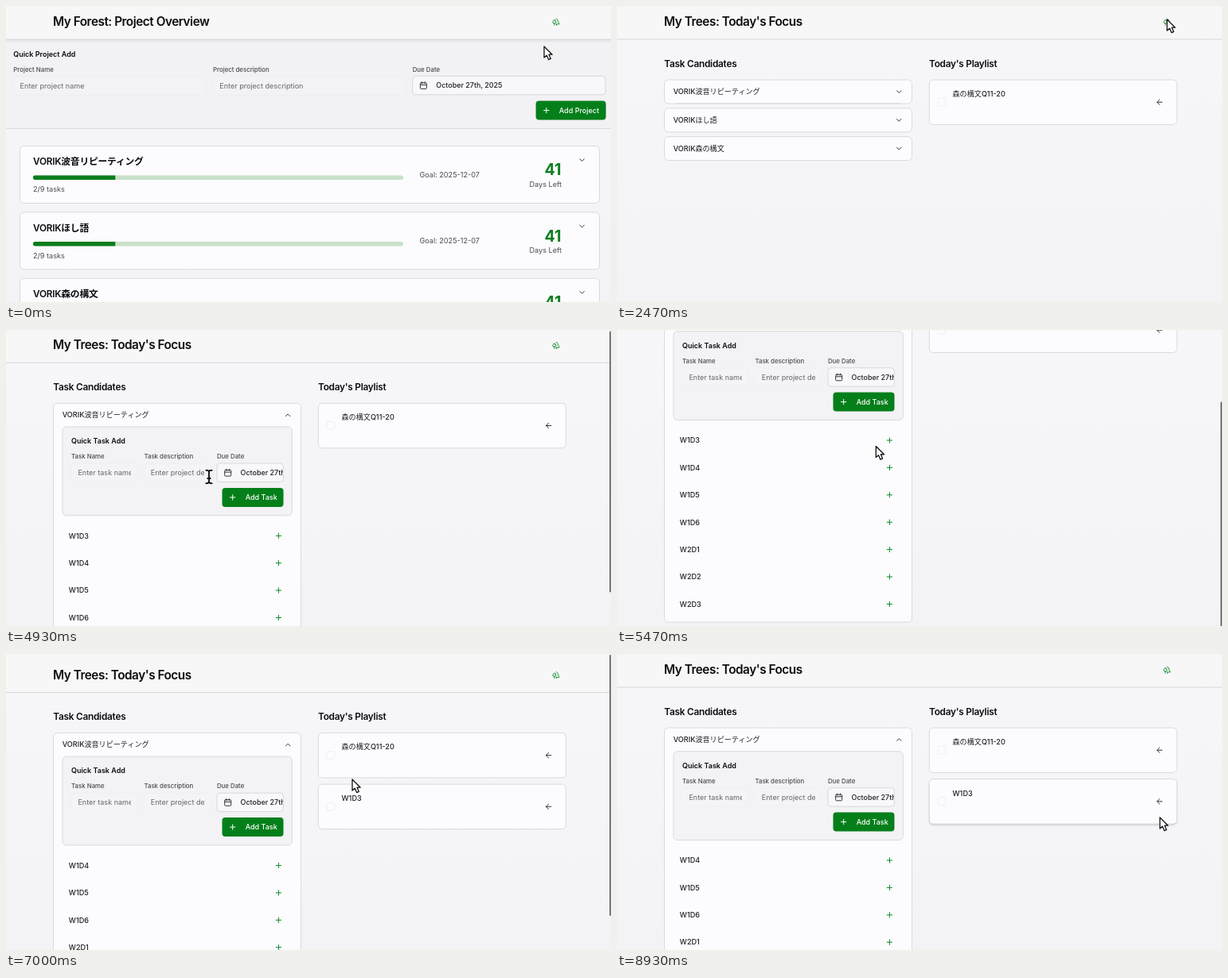
Recreate the animation shown at these times as an HTML page. Size 760 px wide and 373 px high, loop 8.99 s.

```html
<!DOCTYPE html>
<html lang="en">
<head>
<meta charset="utf-8">
<title>Project planner</title>
<style>
html, body { margin: 0; width: 100%; height: 100%; overflow: hidden; background: #f5f4f6; }
svg { display: block; width: 760px; height: 373px; }
text { font: 400 9.1px Inter, "Noto Sans CJK JP", sans-serif; fill: #202024; white-space: pre; }
.title { font-size: 15.3px; font-weight: 600; letter-spacing: -.03em; fill: #0c0c0f; }
.head { font-size: 11.8px; font-weight: 600; letter-spacing: -.02em; fill: #0c0c0f; }
.sub { font-size: 9px; font-weight: 600; fill: #0c0c0f; }
.label { font-size: 7.85px; font-weight: 500; fill: #4a4a50; }
.hint { font-size: 9.05px; fill: #66666c; }
.mid { font-weight: 500; }
.date { font-size: 8.95px; font-weight: 500; }
.btn { font-size: 9px; font-weight: 500; fill: #fff; }
.soft { fill: #4a4a50; }
.days { font-size: 19.6px; font-weight: 700; fill: #0a7d1c; text-anchor: end; }
.end { text-anchor: end; }
.icon { fill: none; stroke: #35353a; stroke-width: 1; stroke-linecap: round; stroke-linejoin: round; }
.green { stroke: #0a8a26; }
.white { stroke: #fff; }
</style>
</head>
<body>
<svg id="stage" viewBox="0 0 760 373" xmlns="http://www.w3.org/2000/svg"></svg>
<script>
const LOOP = 8990, ROW = 34.4, STEP = 35.8;
const BOOKS = ['VORIK波音リピーティング', 'VORIKほし語', 'VORIK森の構文'];
const TASKS = ['W1D3', 'W1D4', 'W1D5', 'W1D6', 'W2D1', 'W2D2', 'W2D3'];

const text = (x, y, s, cls = '') => `<text x="${x}" y="${y}" class="${cls}">${s}</text>`;
const box = (x, y, w, h, fill, line = 'none', r = 5, extra = '') =>
  `<rect x="${x}" y="${y}" width="${w}" height="${h}" rx="${r}" fill="${fill}" stroke="${line}" ${extra}/>`;
const icon = (x, y, d, cls = '', extra = '') =>
  `<g transform="translate(${x} ${y})"><path class="icon ${cls}" d="${d}" ${extra}/></g>`;
const group = (id, body, extra = '') => `<g id="${id}" ${extra}>${body}</g>`;

const CHEVRON = 'M-2.7-1.3L0 1.4L2.7-1.3';
const PLUS = 'M-3.2 0H3.2M0-3.2V3.2';
const BACK = 'M3.2 0H-3.2M0-3.2L-3.2 0L0 3.2';
const CALENDAR = 'M-3-3.2H3Q4-3.2 4-2.2V3.4Q4 4.4 3 4.4H-3Q-4 4.4-4 3.4V-2.2Q-4-3.2-3-3.2ZM-4-.6H4M-1.8-4.4V-2.4M1.8-4.4V-2.4';
const PENCIL = 'M2.2-4.2Q3.2-5 4.2-4Q5-3.1 4.2-2.2L-2.2 4.2L-4.6 4.8L-4 2.3ZM1-3L3.1-.9';
const TREES = 'M10 10v.2A3 3 0 0 1 8.9 16H5a3 3 0 0 1-1-5.8V10a3 3 0 0 1 6 0ZM7 16v6M13 19v3M12 19h8.3a1 1 0 0 0 .7-1.7L18 14h.3a1 1 0 0 0 .7-1.7L16 9h.2a1 1 0 0 0 .8-1.7L13 3l-1.4 1.5';

function header(title) {
  return `<rect y="-20" width="760" height="62" fill="#f7f7f8"/>
    <path d="M0 42H760" stroke="#d6d6d9"/>
    ${text(59, 25.2, title, 'title')}
    <g transform="translate(685.8 14.6) scale(.437)"><path class="icon green" stroke-width="2" style="stroke-width:2.1" d="${TREES}"/></g>`;
}

function button(x, y, w, label) {
  return box(x, y, w, 24, '#047f1a', 'none', 4)
    + icon(x + 13.2, y + 12, PLUS, 'white')
    + text(x + 29.2, y + 15.3, label, 'btn');
}

function dateField(x, y, w, clip = '') {
  return box(x, y, w, 23.5, '#f8f7f9', '#d8d8db', 4)
    + icon(x + 13.7, y + 11.7, CALENDAR, '', 'stroke="#202024"')
    + `<g ${clip}>${text(x + 29.6, y + 15, 'October 27th, 2025', 'date')}</g>`;
}

function projectCard(name, i) {
  const y = 176.5 + i * 83.4;
  return box(17.5, y, 728, 72, '#fcfbfd', '#dadadd')
    + text(34, y + 23.9, name, 'head')
    + box(34, y + 37, 465, 5.5, '#c8e1c9', 'none', 2.7)
    + `<path d="M137.3 ${y + 37}H36.7a2.75 2.75 0 0 0 0 5.5H137.3Z" fill="#0a7d1c"/>`
    + text(34, y + 57.7, '2/9 tasks', 'soft')
    + text(519.5, y + 39.1, 'Goal: 2025-12-07', 'soft')
    + text(697.5, y + 36.6, '41', 'days')
    + text(698, y + 51, 'Days Left', 'soft end')
    + icon(723.6, y + 17.6, CHEVRON);
}

function forestPage() {
  return '<rect y="42" width="760" height="112.5" fill="#f2f1f3"/><path d="M0 154.5H760" stroke="#dbdbde"/>'
    + header('My Forest: Project Overview')
    + '<rect y="42.5" width="760" height="4" fill="url(#shade)"/>'
    + text(9.3, 63.6, 'Quick Project Add', 'sub')
    + text(9.3, 83, 'Project Name', 'label')
    + text(260, 83, 'Project description', 'label')
    + text(510.7, 83, 'Due Date', 'label')
    + box(9.5, 88.5, 242, 23.5, '#f3f2f4', '#eeedef', 4)
    + box(260.5, 88.5, 242, 23.5, '#f3f2f4', '#eeedef', 4)
    + text(17.6, 103.5, 'Enter project name', 'hint')
    + text(268.3, 103.5, 'Enter project description', 'hint')
    + dateField(510.7, 88.3, 242.3)
    + button(665.6, 119.6, 88, 'Add Project')
    + BOOKS.map(projectCard).join('');
}

function quickTask() {
  return box(71, 122.7, 288.3, 111.8, '#f3f2f4', '#d9d9dc')
    + text(82, 143.6, 'Quick Task Add', 'sub')
    + text(82, 163, 'Task Name', 'label')
    + text(173.4, 163, 'Task description', 'label')
    + text(264.9, 163, 'Due Date', 'label')
    + box(82, 169, 83, 23, '#f4f3f5', '#f0eff1', 4)
    + box(173.5, 169, 83, 23, '#f4f3f5', '#f0eff1', 4)
    + `<g clip-path="url(#nameClip)">${text(90.4, 183.7, 'Enter task name', 'hint')}</g>`
    + `<g clip-path="url(#descClip)">${text(181.8, 183.7, 'Enter project description', 'hint')}</g>`
    + dateField(265, 168.7, 83.5, 'clip-path="url(#dateClip)"')
    + button(271.5, 199.6, 77, 'Add Task');
}

function taskRow(name, i) {
  const y = 260 + i * ROW;
  return `<g>${text(78.8, y + 3.3, name, 'mid')}${icon(342.4, y, PLUS, 'green')}</g>`;
}

function bookCard(name, i) {
  const y = 93 + i * STEP;
  return box(59.5, y, 311, 30, '#fcfbfd', '#dadadd')
    + text(70.7, y + 18, name, 'mid') + icon(354.2, y + 15, CHEVRON);
}

function playCard(name, y) {
  return box(392.3, y, 311, 56.5, '#fcfbfd', '#dadadd')
    + box(403, y + 23, 10, 10, '#fcfbfd', '#efeef0', 3)
    + text(421.5, y + 21, name, 'mid') + icon(681.6, y + 28.2, BACK);
}

function treesPage() {
  const hover = box(71, 245.5, 288.5, 29, '#e9e8ea', 'none', 4)
    + box(333, 250.7, 19, 18.6, '#c4f9c9', 'none', 4)
    + icon(321, 260, PENCIL, '', 'stroke="#55555a"');
  return header("My Trees: Today's Focus")
    + text(59.3, 77, 'Task Candidates', 'head')
    + text(392, 77, "Today's Playlist", 'head')
    + box(59.5, 93, 311, 30, '#fcfbfd', '#dadadd', 5, 'id="openCard"')
    + text(70.7, 111, BOOKS[0], 'mid')
    + `<g transform="translate(354.2 108)"><path id="chevron" class="icon" d="${CHEVRON}"/></g>`
    + `<g clip-path="url(#openClip)">${quickTask()}${group('rowHover', hover)}${group('rows', TASKS.map(taskRow).join(''))}</g>`
    + group('lower', bookCard(BOOKS[1], 1) + bookCard(BOOKS[2], 2))
    + playCard('森の構文Q11-20', 93)
    + group('added', box(392.3, 158.8, 311, 57, '#c9c9ce', 'none', 5, 'id="cardShade" filter="url(#blur)"') + playCard('W1D3', 157.6));
}

const clip = (id, x, y, w, h) =>
  `<clipPath id="${id}"><rect id="${id}Box" x="${x}" y="${y}" width="${w}" height="${h}"/></clipPath>`;

const ARROW = 'M0 0V14L3.2 11.2L5.6 16.6L8.3 15.4L6 10.2H10.2Z';
const BEAM = 'M-3.6-8.3Q0-8.3 0-6V6Q0 8.3-3.6 8.3M3.6-8.3Q0-8.3 0-6M0 6Q0 8.3 3.6 8.3M-1.8 2H1.8';

document.getElementById('stage').innerHTML = `<defs>
  <linearGradient id="bg" x2="0" y2="1"><stop stop-color="#f7f6f8"/><stop offset="1" stop-color="#f3f2f5"/></linearGradient>
  <linearGradient id="shade" x2="0" y2="1"><stop stop-color="#000" stop-opacity=".07"/><stop offset="1" stop-color="#000" stop-opacity="0"/></linearGradient>
  <filter id="blur"><feGaussianBlur stdDeviation="1.1"/></filter>
  ${clip('nameClip', 82, 165, 75, 30)}${clip('descClip', 173, 165, 76, 30)}
  ${clip('dateClip', 265, 165, 83, 30)}${clip('openClip', 59, 93, 312, 30)}
  </defs>
  <rect width="760" height="373" fill="url(#bg)"/>`
  + group('forest', forestPage()) + group('trees', treesPage())
  + box(758, 1, 2.5, 329, '#77777b', 'none', 1.2, 'id="bar"')
  + group('cursor', `<path id="arrow" d="${ARROW}" fill="#fff" stroke="#111" stroke-width="1.3" stroke-linejoin="round"/>
    <g id="beam" fill="none" stroke-linecap="round"><path d="${BEAM}" stroke="#fff" stroke-width="3.6"/><path d="${BEAM}" stroke="#111" stroke-width="1.9"/></g>`);

const el = {};
document.querySelectorAll('[id]').forEach(n => el[n.id] = n);

const smooth = p => p * p * (3 - 2 * p);
const ramp = (t, a, b) => Math.min(1, Math.max(0, (t - a) / (b - a)));

// Value of a [time, ...values] track, eased between its stops.
function track(keys, t) {
  let i = keys.findIndex(k => k[0] > t);
  if (i < 0) return keys[keys.length - 1].slice(1);
  if (i === 0) return keys[0].slice(1);
  const a = keys[i - 1], b = keys[i], p = smooth(ramp(t, a[0], b[0]));
  return a.slice(1).map((v, j) => v + (b[j + 1] - v) * p);
}

const POINTER = [
  [70, 676, 51], [730, 689, 18], [930, 689, 18], [1400, 694, 23], [1530, 695, 23], [1800, 693, 22],
  [2200, 691, 17], [2930, 691, 17], [3330, 267, 116.4], [3470, 267, 116.4], [3530, 267, 117],
  [4000, 267, 117], [4500, 255, 185], [5180, 255, 185], [5580, 341, 138], [6380, 341, 138],
  [6530, 422, 152], [7000, 435, 158], [7470, 437, 159], [8300, 664, 192], [8900, 682, 206]
];
const SCROLL = [[4860, 0], [4930, .7], [5420, 121], [6560, 121], [6920, -8], [7000, -6.5], [7380, 0]];

const show = (node, on) => node.setAttribute('visibility', on ? 'visible' : 'hidden');
const move = (node, x, y) => node.setAttribute('transform', `translate(${x} ${y})`);

function draw(t) {
  const onTrees = t >= 2200, moved = t >= 6530;
  el.forest.style.display = onTrees ? 'none' : '';
  el.trees.style.display = onTrees ? '' : 'none';

  const [scroll] = track(SCROLL, t);
  move(el.trees, 0, -scroll);

  const open = 1 - (1 - ramp(t, 3900, 4140)) ** 3;
  const grow = open * (moved ? 331.6 : 366);
  el.openCard.setAttribute('height', 30 + grow);
  el.openClipBox.setAttribute('height', 30 + grow);
  el.chevron.setAttribute('transform', `rotate(${180 * open})`);
  move(el.lower, 0, grow);

  move(el.rows, 0, moved ? -ROW : 0);
  el.rows.firstElementChild.style.display = moved ? 'none' : '';
  el.rowHover.style.display = t >= 5540 && t < 6590 ? '' : 'none';
  el.added.style.display = moved ? '' : 'none';
  el.cardShade.setAttribute('opacity', ramp(t, 7470, 7620));

  const bar = ramp(t, 4670, 4800) - ramp(t, 5600, 5850) + ramp(t, 6560, 6630) - ramp(t, 7600, 7850);
  el.bar.setAttribute('opacity', bar);
  el.bar.setAttribute('y', 1 + Math.max(0, scroll) * .74);

  const beam = (t >= 1400 && t < 2200) || (t >= 4300 && t < 5300);
  const [x, y] = track(POINTER, t);
  move(el.cursor, x, y);
  show(el.arrow, !beam);
  show(el.beam, beam);
}

function tick() {
  draw(performance.now() % LOOP);
  requestAnimationFrame(tick);
}
tick();
</script>
</body>
</html>
```
